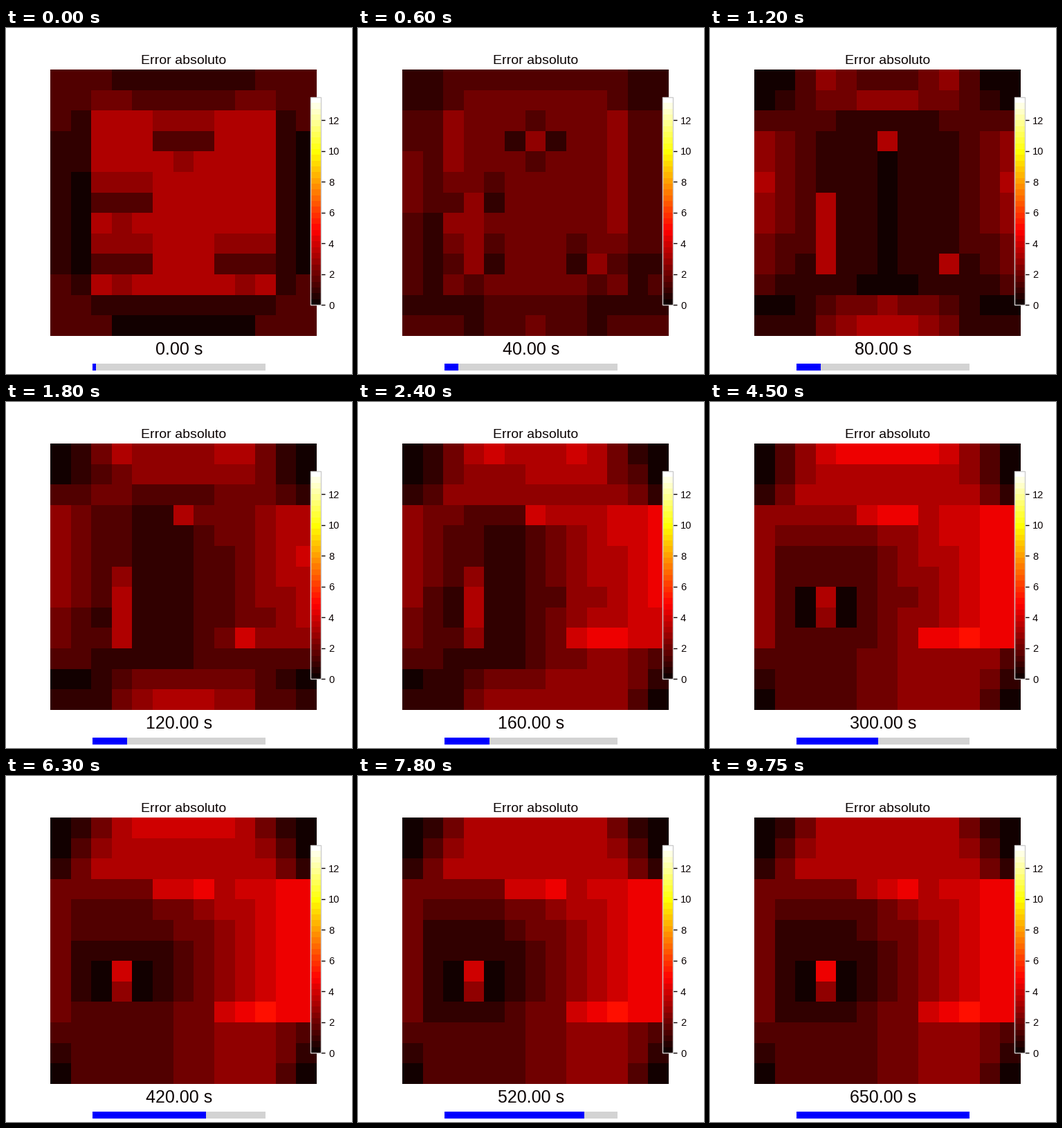
These frames come from a looping animation (500x500 px, 9.9 s). A matplotlib script:

```python
import numpy as np
import matplotlib.pyplot as plt
from matplotlib.animation import FuncAnimation
from matplotlib.cm import ScalarMappable
from matplotlib.colors import ListedColormap, Normalize
from matplotlib.patches import Rectangle

plt.rcParams["font.family"] = "Liberation Sans"

SIZE = 500
CELLS = 13
FRAMES = 66
BANDS = 22
INK = "#0c0404"

rows, cols = np.mgrid[:CELLS, :CELLS].astype(float)
col = np.arange(CELLS)
off = np.abs(col - 6)
sensors = [(3, 6), (6, 3), (9, 3), (9, 9)]
edge = np.minimum(cols, 12 - cols) + np.minimum(rows, 12 - rows) / 2


def bell(x, width):
    return np.exp(-(x / width) ** 2)


def start_field():
    """A hot square inside a cool rim, dented at each sensor."""
    dr, dc = np.abs(rows - 6), np.abs(cols - 6)
    field = np.where(np.maximum(dr, dc) <= 4, 5.0, 1.0)
    field[dr + dc >= 10] = 2
    field[1, 2:11] = 1.6 + 0.4 * off[2:11]
    field[12, 3:10] = 0
    field[3:10, 12] = 0
    field[5:10, 1] = 0
    for r, c in sensors:
        field[r - 1, c - 1:c + 2] = 4
        field[r, c - 1:c + 2] = 2
        field[r + 1, c] = 4
    return field


def early_field():
    """Cool in the middle, warm at the sides and along top and bottom."""
    field = 0.45 + 4.1 * ((cols - 6) / 6) ** 2 * bell(rows - 5, 5)
    field[2] = np.minimum(field[2] + 0.5, 2)
    field[0] = np.interp(off, [0, 1, 3, 5], [2, 2, 4, 0])
    field[1] = 3.65 - 0.12 * off ** 2
    field[11] = 3.5 - 0.17 * off ** 2
    field[12] = np.maximum(5.2 - 0.25 * off ** 2, 1)
    for r, c in sensors:
        field[r, c] = 5
    field[7:9, 3] = 5
    return np.maximum(field, 0)


def steady_field(lift, crest, spot):
    """Rises to the right, with a warm top edge and hot sensor rows."""
    left = 0.8 + lift + 0.15 * (rows - 7) ** 2
    field = left + (7 - left) * np.clip((cols - 4.5) / 7, 0, 1)
    field[3:10, 0] = 3 + lift
    for r, c in sensors[::3]:
        field[r, c - 1:c + 2] += 2
    field[7:9, 2:5:2] = 0
    field[7:9, 3] = spot, 4

    field[:3] = np.minimum(5, 1.9 * (edge[:3] - 0.6))
    field[0] = np.minimum(5 + crest, 1.9 * (edge[0] - 0.6) + crest / 2)
    floor = 1.6 + lift / 2 + 2.3 * bell(cols[10:] - 9, 3.5)
    field[10:] = np.minimum(floor, 2.2 * edge[10:])
    return np.maximum(field, 0)


def rising_field(early, peak):
    """The right side and the top move ahead of the rest."""
    lead = np.clip((cols - 3) / 6, 0.3, 0.85)
    lead[:3] = np.maximum(lead[:3], 0.65)
    return early + (peak - early) * lead


early = early_field()
peak = steady_field(0.7, 2, 5)
times = [0, 80, 160, 300, 420, 650]
fields = [start_field(), early, rising_field(early, peak), peak,
          steady_field(0.1, 0.8, 6), steady_field(0, -0.1, 7)]


def levels_at(seconds):
    k = min(np.searchsorted(times, seconds, side="right"), len(times) - 1)
    mix = (seconds - times[k - 1]) / (times[k] - times[k - 1])
    return np.rint(fields[k - 1] * (1 - mix) + fields[k] * mix)


def heat(count):
    return ListedColormap(plt.get_cmap("hot")(np.linspace(0.014, 1, count)))


def box(x, y, w, h):
    """Pixel box measured from the top left, as figure fractions."""
    return x / SIZE, 1 - (y + h) / SIZE, w / SIZE, h / SIZE


def add_bar(width, color):
    x, y, w, h = box(125, 485, width, 10)
    return fig.add_artist(Rectangle((x, y), w, h, color=color, linewidth=0))


fig = plt.figure(figsize=(5, 5), dpi=100, facecolor="white")

ax = fig.add_axes(box(64, 60, 385, 385))
image = ax.imshow(levels_at(0), cmap=heat(BANDS), vmin=-0.5, vmax=BANDS - 0.5,
                  interpolation="nearest", aspect="auto")
ax.set_axis_off()
ax.set_title("Error absoluto", fontsize=14, color=INK)

cax = fig.add_axes(box(440, 100, 15, 300))
scale = fig.colorbar(ScalarMappable(Normalize(0, 13.5), heat(36)), cax=cax,
                     ticks=range(0, 13, 2))
scale.outline.set_edgecolor("0.8")
scale.outline.set_linewidth(1)
cax.tick_params(length=4.4, width=1, pad=3.5, labelsize=10.5,
                color=INK, labelcolor=INK)

clock = fig.text(0.5, 1 - 472 / SIZE, "", fontsize=18, ha="center", color=INK)
add_bar(250, "lightgray")
progress = add_bar(5, "blue")


def draw(i):
    seconds = 10 * i
    image.set_data(levels_at(seconds))
    clock.set_text(f"{seconds:.2f} s")
    filled = min(round(250 * (i + 1) / FRAMES) + 1, 250)
    progress.set_width(filled / SIZE)
    return image, clock, progress


anim = FuncAnimation(fig, draw, frames=FRAMES, interval=150, repeat=True)
plt.show()
```
